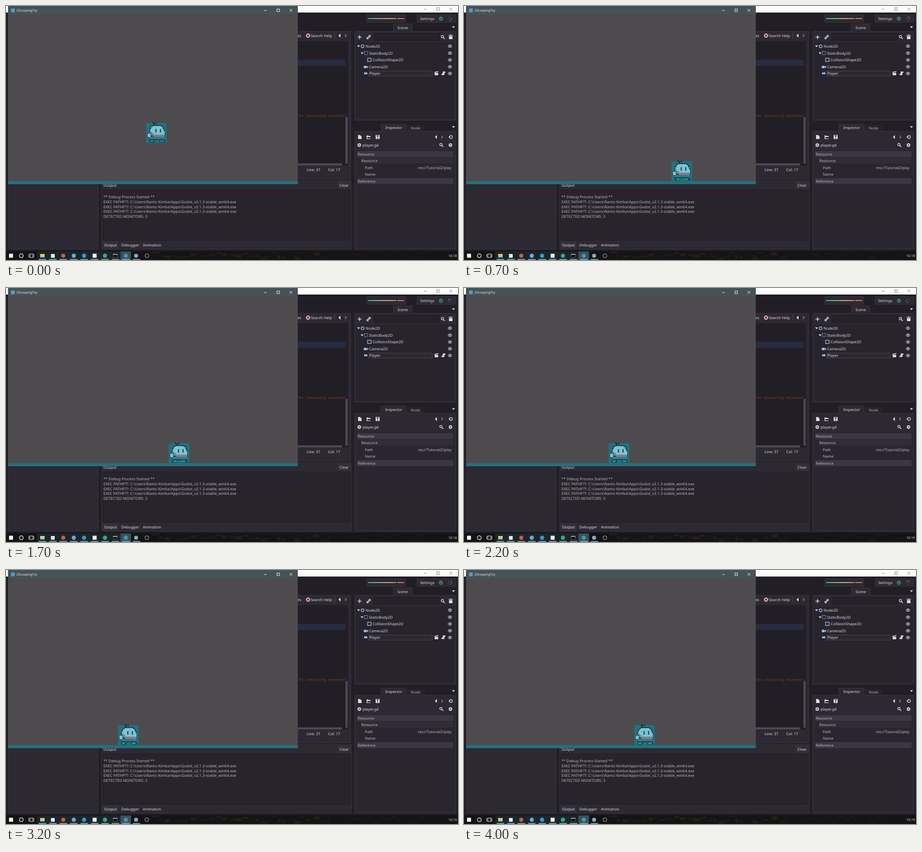
An HTML page with a canvas for the animation above (4050 ms loop, 900 by 506 pixels).

```html
<!DOCTYPE html>
<html lang="en">
<head>
<meta charset="utf-8">
<title>Platform game test</title>
<style>
html, body { margin: 0; width: 100%; height: 100%; overflow: hidden; background: #211e26; }
canvas { display: block; }
</style>
</head>
<body>
<canvas id="stage" width="900" height="506"></canvas>
<script>
const c = document.getElementById('stage').getContext('2d');
c.textRendering = 'geometricPrecision';
const LOOP = 4050, STEP = 50;
const PANEL = '#2c2933', DARK = '#27242d', EDGE = '#37343e', INK = '#dcdadf', TEAL = '#23707d';
const UI = '"Noto Sans", sans-serif', MONO = '"Noto Sans Mono", monospace';

// time, x: turning points of the walk
const walk = [[0, 279], [240, 279], [634, 440], [1310, 162], [1905, 409],
  [2780, 51], [3690, 423], [3895, 339], [LOOP, 339]];

function box(x, y, w, h, fill, edge) {
  c.fillStyle = fill;
  c.fillRect(x, y, w, h);
  if (edge) {
    c.strokeStyle = edge;
    c.lineWidth = 1;
    c.strokeRect(x + .5, y + .5, w - 1, h - 1);
  }
}
function text(s, x, y, color = INK, size = 7.5, family = UI) {
  c.font = `${size}px ${family}`;
  c.fillStyle = color;
  c.fillText(s, x, y);
}
function dot(x, y, r, color) {
  c.beginPath();
  c.arc(x, y, r, 0, 7);
  c.fillStyle = color;
  c.fill();
}
function ring(x, y, r, color = INK, width = 1) {
  c.beginPath();
  c.arc(x, y, r, 0, 7);
  c.strokeStyle = color;
  c.lineWidth = width;
  c.stroke();
}
function line(points, color = INK, width = 1) {
  c.beginPath();
  for (let i = 0; i < points.length; i += 2) c.lineTo(points[i], points[i + 1]);
  c.strokeStyle = color;
  c.lineWidth = width;
  c.stroke();
}
function shape(points, color = INK) {
  c.beginPath();
  for (let i = 0; i < points.length; i += 2) c.lineTo(points[i], points[i + 1]);
  c.fillStyle = color;
  c.fill();
}
function frame(x, y, w, h, color, width = 1) {
  c.strokeStyle = color;
  c.lineWidth = width;
  c.strokeRect(x, y, w, h);
}
const down = (x, y) => shape([x - 3, y - 1.5, x + 3, y - 1.5, x, y + 2]);
const side = (x, y, dir, color) => shape([x - 2 * dir, y - 4, x - 2 * dir, y + 4, x + 2 * dir, y], color);

function lens(x, y) {
  ring(x - 1, y - 1, 2.3, INK, 1.2);
  line([x + 1, y + 1, x + 3.6, y + 3.6], INK, 1.5);
}
function eye(x, y) {
  c.beginPath();
  c.ellipse(x, y, 3.6, 2.7, 0, 0, 7);
  c.strokeStyle = INK;
  c.lineWidth = 1;
  c.stroke();
  dot(x, y, 1.4, INK);
}
function gear(x, y) {
  ring(x, y, 2.2, INK, 1.8);
  for (let i = 0; i < 8; i++) {
    const a = i * Math.PI / 4, u = Math.cos(a), v = Math.sin(a);
    line([x + u * 2, y + v * 2, x + u * 4, y + v * 4], INK, 1.2);
  }
}
function windowButtons(x, y, gap, color) {
  line([x - 2.5, y + .5, x + 2.5, y + .5], color);
  frame(x + gap - 2.5, y - 2.5, 5, 5, color);
  const k = x + 2 * gap;
  line([k - 2.7, y - 2.7, k + 2.7, y + 2.7], color);
  line([k + 2.7, y - 2.7, k - 2.7, y + 2.7], color);
}

function toolbar(t) {
  box(0, 0, 900, 506, '#211e26');
  box(0, 0, 900, 13, '#fdfdfd');
  windowButtons(835, 6, 25.3, '#8c8c8c');
  box(718, 17, 78, 16, PANEL, EDGE);
  const g = c.createLinearGradient(721, 0, 794, 0);
  g.addColorStop(0, '#48ad99');
  g.addColorStop(.5, '#b9b36c');
  g.addColorStop(1, '#d9605c');
  box(721, 24, 56, 2, g);
  box(779, 24, 14, 2, g);
  box(818, 17, 78, 16, PANEL, EDGE);
  text('Settings', 824.5, 28);
  dot(866, 25.3, 4, '#3c8468');
  line([864, 25.3, 865.5, 27, 868.3, 23.8], PANEL, 1.1);
  for (let i = 0; i < 8; i++) {
    const a = i * Math.PI / 4, lit = (i + Math.floor(t / 350)) % 8 < 3;
    dot(884 + 3.4 * Math.cos(a), 25.3 + 3.4 * Math.sin(a), .8, lit ? '#a4a1aa' : '#57535e');
  }
}

function sceneDock() {
  box(771, 35, 38, 16, PANEL, EDGE);
  box(694, 50, 202, 178, PANEL, EDGE);
  box(772, 50, 36, 2, PANEL);
  text('Scene', 779.5, 45.5);
  down(891, 42);
  line([700, 62, 708, 62], INK, 1.4);
  line([704, 58, 704, 66], INK, 1.4);
  line([719, 65, 725, 59], INK, 1.4);
  ring(720, 64, 2);
  ring(724, 60, 2);
  box(732, 54, 132, 15, '#25222a', '#1c1a20');
  lens(870, 62);
  box(882, 60, 7, 6, INK);
  box(881, 58, 9, 1, INK);
  box(884, 57, 3, 1, INK);
  box(697, 73, 196, 152, DARK);
  box(722, 129, 127, 11, '#2b2831', '#48444f');

  [['Node2D', 716, 80], ['StaticBody2D', 723, 94], ['CollisionShape2D', 730, 107.5],
    ['Camera2D', 723, 121], ['Player', 723.5, 134.5]].forEach(([name, x, y]) => {
    text(name, x, y + 2.8);
    eye(884, y);
  });
  down(702, 80);
  down(709, 94);
  const blue = '#9fb9e4';
  ring(710, 80.3, 2.8, blue, 1.4);
  c.setLineDash([2, 1]);
  frame(713.5, 90.5, 6.5, 6.5, blue);
  c.setLineDash([]);
  frame(720, 104, 7, 6.5, blue, 1.3);
  box(712.5, 119, 5.5, 5, blue);
  shape([717.5, 121.5, 721, 119, 721, 124], blue);
  box(713, 133, 6.5, 3, blue);
  dot(714.5, 132.5, 1, blue);
  dot(718, 132.5, 1, blue);
  box(853.5, 133, 7, 5, INK);
  line([853, 132, 861, 130.5], INK, 1.6);
  shape([869.5, 130.5, 875, 130.5, 875, 133, 873, 133, 873, 137.5, 867, 137.5, 867, 135, 869.5, 135]);
}

function inspectorDock() {
  box(746, 235, 51, 15, PANEL, EDGE);
  box(798, 237, 36, 12, '#26232b');
  box(694, 249, 202, 236, PANEL, EDGE);
  box(747, 249, 49, 2, PANEL);
  text('Inspector', 755, 245);
  text('Node', 806, 245.5, '#aaa7af');
  down(891, 241);
  shape([701, 257, 705, 257, 708, 260, 708, 265, 701, 265]);
  shape([718, 258, 721, 258, 722, 259, 726, 259, 726, 265, 718, 265]);
  box(719.5, 261, 7, 3, PANEL);
  box(736, 257, 8, 8, INK);
  box(738, 258, 4, 2, PANEL);
  box(739, 262, 2, 2, PANEL);
  side(856, 261, -1);
  side(869, 261, 1, '#68646e');
  ring(886, 261, 2.8, INK, 1.2);
  shape([881, 260, 885, 260, 883, 263]);
  gear(703.5, 277);
  text('player.gd', 710, 279.7);
  lens(867, 277);
  gear(885, 277);
  box(697, 287, 196, 195, '#29262f');
  const header = '#3b3742', soft = '#bcb9c1';
  box(699, 289, 192, 12, header);
  box(706, 302, 185, 12, '#302d36');
  box(699, 343, 192, 12, header);
  text('Resource', 700.5, 297.5, soft);
  text('Resource', 707.5, 311, soft);
  text('Path', 714.5, 324.5, soft);
  text('Name', 714.5, 338, soft);
  text('Reference', 700.5, 351.5, soft);
  text('res://Tutorial2/play', 820, 324.5, soft);
}

function scriptEditor() {
  box(560, 50, 127, 295, PANEL, EDGE);
  text('es', 580, 62);
  ring(601.5, 59, 3, '#e6e0e2', 2.2);
  for (let i = 0; i < 4; i++) {
    c.beginPath();
    c.arc(601.5, 59, 3, i * Math.PI / 2 + .4, i * Math.PI / 2 + 1.1);
    c.strokeStyle = '#d96a62';
    c.lineWidth = 2.2;
    c.stroke();
  }
  text('Search Help', 607, 62);
  line([654.5, 53, 654.5, 65], '#4a4652');
  side(664, 59, -1);
  side(677, 59, 1, '#68646e');
  box(560, 70, 121, 248, '#211e26');
  box(560, 107, 116, 12, '#272d40');
  c.save();
  c.beginPath();
  c.rect(560, 200, 115.5, 40);
  c.clip();
  text('The remaining movement', 578.5, 220.5, '#753c24', 7.5, MONO);
  c.restore();
  box(676, 221, 4, 93, '#4f4b55');
  box(560, 313.5, 109, 4, '#4f4b55');
  text('Line: 37', 598.5, 328.8);
  text('Col: 17', 641.5, 328.8);
}

function outputDock() {
  box(4, 340, 180, 145, PANEL, EDGE);
  box(190, 347, 498, 138, PANEL, EDGE);
  text('Output:', 194, 359.8);
  box(660, 350, 26, 14, '#312e38', EDGE);
  text('Clear', 664, 359.8);
  box(192, 366, 494, 101, DARK, '#1f1c23');
  const exec = 'EXEC PATHP??: C:\\Users\\Ranto Kimba\\Apps\\Godot_v2.1.3-stable_win64.exe';
  ['** Debug Process Started **', exec, exec, exec, 'DETECTED MONITORS: 3']
    .forEach((s, i) => text(s, 194, 383.4 + i * 9.6, '#b9b6bd', 7.6));
  box(192, 469, 32, 14, '#34303b');
  text('Output', 195.5, 478.7);
  text('Debugger', 229.5, 478.7);
  text('Animation', 272.5, 478.7);
}

function taskbar(t) {
  box(0, 488, 900, 18, '#141316');
  let seed = 7;
  const rnd = () => (seed = seed * 16807 % 2147483647) / 2147483647;
  for (let x = 290; x < 880; x += 7 + rnd() * 9) {
    const y = 489 + rnd() * 11, w = 4 + rnd() * 13, h = 2 + rnd() * 5;
    box(x, y, w, h, x < 620 ? (rnd() < .6 ? '#251e17' : '#1b1b19') : '#19171b');
  }
  box(62, 489, 187, 17, '#1b262a');
  box(228, 489, 21, 17, '#36535b');
  box(6, 493.5, 8, 8, '#f2f2f2');
  ring(30.5, 497.5, 3.8, '#eee', 1.3);
  frame(47.5, 494, 6, 7, '#ddd');
  line([45.5, 494, 45.5, 501], '#ddd');
  line([55.5, 494, 55.5, 501], '#ddd');
  box(68, 494, 9, 7, '#e8c766');
  box(68, 498, 9, 3, '#86bfd0');
  box(89.5, 494, 7.5, 7.5, '#e8e8e8');
  dot(114, 497.5, 4, '#cf5947');
  dot(135, 497.5, 4.2, '#6ea5d1');
  dot(155.5, 497.5, 4.2, '#3799cc');
  box(172.5, 493.5, 8, 8, '#ededed');
  dot(197, 497.5, 4.2, '#3aa880');
  box(213, 494, 9, 7, '#050505', '#555');
  box(213, 494, 9, 1.5, '#ccc');
  dot(238.5, 497.5, 4.2, '#4d8fb7');
  dot(259, 497.5, 4, '#8ba9bc');
  ring(280.5, 497.5, 3.8, '#bbb');
  for (let i = 0; i < 10; i++) box(65 + i * 20.8, 504, 15, 1.5, '#8db9c2');
  text(t < 1950 ? '10.18' : '10.19', 881, 500, '#eee', 6.6, '"Open Sans", sans-serif');
}

function gameWindow() {
  box(4, 0, 577, 17, '#455258');
  box(4, 17, 577, 332, '#4d4b4d');
  box(4, 349, 577, 6, TEAL);
  box(10, 5, 7.5, 7.5, '#5b9abf');
  text('2DLeapingToy', 20.5, 11, '#f2f4f5', 6.4, '"Open Sans", sans-serif');
  windowButtons(516.5, 8.5, 25.4, '#f0f0f0');
}

function walkX(t) {
  const i = walk.findIndex(p => p[0] > t);
  const [t0, x0] = walk[i - 1], [t1, x1] = walk[i];
  return Math.round(x0 + (x1 - x0) * (t - t0) / (t1 - t0));
}
const fallY = t => Math.round(Math.min(309, 233 + .2 * t + .00057 * t * t));

function player(t) {
  const x = walkX(t), y = fallY(t);
  const air = y < 309, moving = t > 240 && t < 3895;
  const lift = moving ? Math.floor(t / 100) % 2 : 0;
  const px = (color, dx, dy, w, h) => box(x + dx, y + dy, w, h, color);
  const NAVY = '#164454', SKY = '#7ec3d2', MAUVE = '#7b828d';

  px(TEAL, 0, 0, 41, 40);
  // hair
  px('#151c22', 13 - lift, -1, 3, 2);
  px('#151c22', 15, 1, 2, 3);
  px('#151c22', 19, -1, 2, 3);
  // head outline, then the dome inside it
  px(NAVY, 12, 4, 19, 3);
  px(NAVY, 9, 6, 25, 4);
  px(NAVY, 7, 9, 29, 6);
  px(NAVY, 6, 14, 32, 13);
  px(SKY, 13, 6, 17, 3);
  px(SKY, 10, 8, 23, 5);
  px(SKY, 8, 12, 27, 5);
  px(SKY, 8, 16, 29, 8);
  px(NAVY, 18.5, 12, 2.2, 7);
  px(NAVY, 27.5, 12, 2.2, 7);
  // scarf
  px(MAUVE, 7, 17, 4, 5);
  px(MAUVE, 10, 20, 5, 5);
  px(MAUVE, 14, 23, 23, 4);
  px('#8a7079', 17, 26, 17, 2);
  // arm and body
  px(NAVY, 2, 20, 8, 9);
  px(SKY, 3, 21, 6, 7);
  px('#2d8394', 8, 28, 28, 4);
  px('#3c7189', 14, 28, 18, 3);
  px(NAVY, 6, 32, 31, 2);
  // feet
  px(NAVY, 6, 35, 11, 4);
  px(NAVY, 26, 35, 12, 4);
  const GREEN = air ? '#2b7d73' : '#2f9a64';
  px(GREEN, 8 + 2 * lift, 35, 6, 3);
  px(GREEN, 28 - 2 * lift, 35, 7, 3);
}

function draw() {
  const t = Math.floor(performance.now() % LOOP / STEP) * STEP;
  toolbar(t);
  sceneDock();
  inspectorDock();
  scriptEditor();
  outputDock();
  taskbar(t);
  gameWindow();
  player(t);
  requestAnimationFrame(draw);
}
draw();
</script>
</body>
</html>
```
